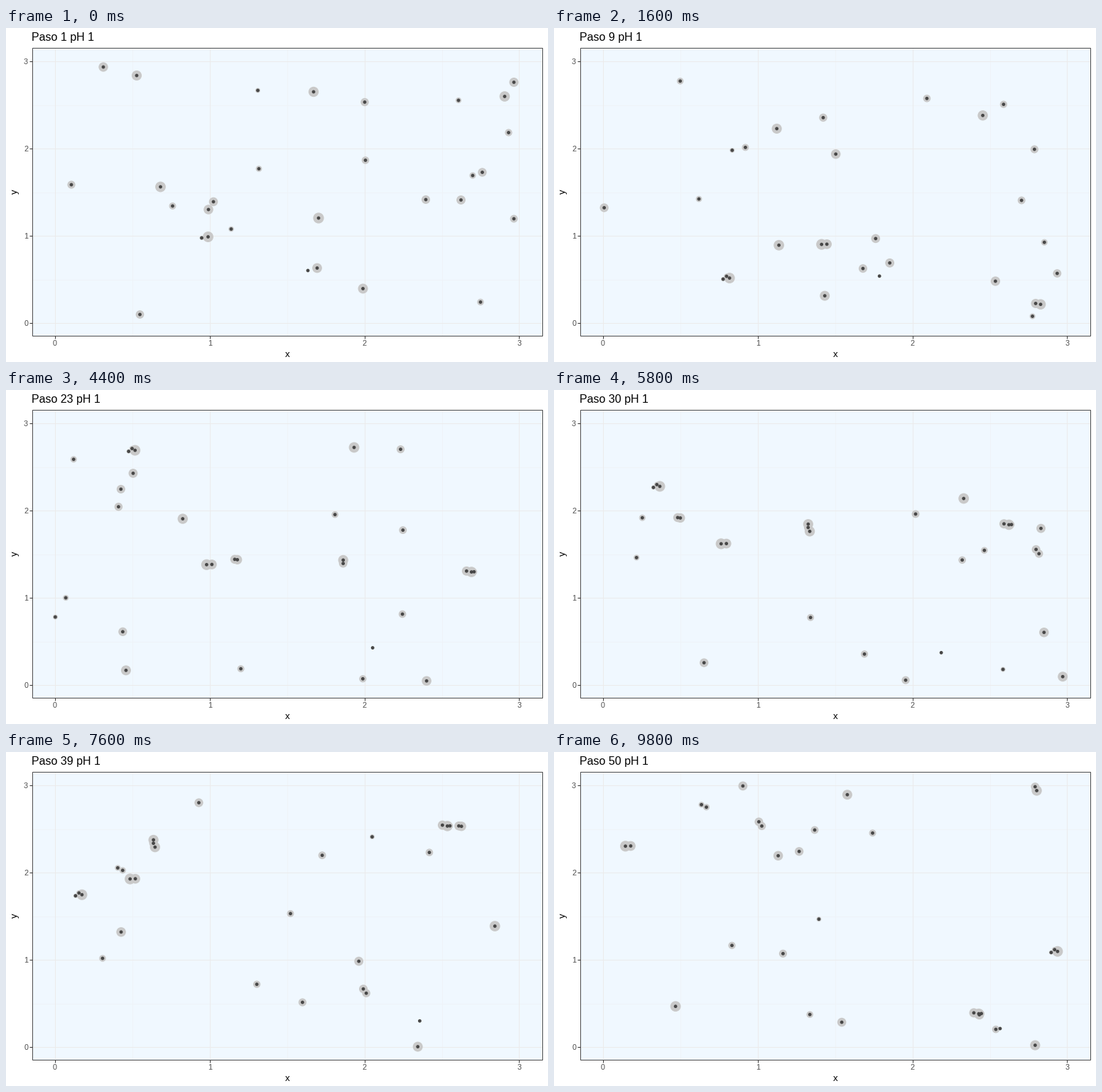
Write a matplotlib script that moves like this. It is 763 by 471 pixels and loops after 10000 ms.

```python
import numpy as np
import matplotlib.pyplot as plt
from matplotlib.animation import FuncAnimation
from matplotlib.patches import Rectangle

W, H, DPI = 763, 471, 100
PX = 72 / DPI                      # one pixel in points
STEPS = 50
CONTACT = 0.055                    # distance at which particles stick, in data units
ORIGIN = np.array([69, 47])        # pixel of x = 0 and of y = 3
SPAN = np.array([653.4, 369.3])    # pixels covered by 0..3
UNIT = SPAN / 3

plt.rcParams["font.family"] = "Liberation Sans"

# start x, y and drift over the whole run, smallest particle first
PATHS = np.array([
    (425, 342, 203, 48), (275.5, 296, -229, 356), (354.5, 88, -635, 517),
    (317, 283.5, -828, 495), (637, 102, 224, -397), (356, 198.5, -931, 261),
    (657, 208, 204, 577), (668, 386.5, 999, 353), (234.5, 251, 214, -506),
    (707.5, 147.5, -457, -244), (506, 186.5, 116, -534), (715, 269, -348, -159),
    (92, 221, -423, -306), (505, 104.5, -772, 134), (188.5, 404, -818, -355),
    (591, 242, -956, 595), (670.5, 203.5, 328, 306), (292, 245, 985, 318),
    (640.5, 242.5, -1028, 544), (715, 76.5, -593, -7), (137, 55, -1035, -412),
    (285, 256, 684, -479), (438, 338.5, -330, -206), (502.5, 367.5, -743, 62),
    (184, 67, 794, 459), (433, 90, 1045, 204), (702, 96.5, -104, -466),
    (217.5, 224, 607, 504), (284.5, 294.5, -229, 356), (440, 268, -407, 372),
])
# particle -> the one it sticks to on first contact
STICKS = {3: 28, 5: 26, 6: 4, 13: 15, 17: 20, 19: 26, 20: 26, 24: 14, 25: 14, 29: 22}

start, speed = PATHS[:, :2], PATHS[:, 2:] / (STEPS - 1)
radii = 2 + 5.6 * np.sqrt(np.linspace(0, 1, len(PATHS)))


def first_contact(a, b):
    n = np.arange(STEPS)[:, None]
    gap = start[a] - start[b] + (speed[a] - speed[b]) * n
    gap = (gap + SPAN / 2) % SPAN - SPAN / 2
    near = np.hypot(*(gap / UNIT).T) < CONTACT
    return near.argmax() if near.any() else STEPS


contact = np.full(len(PATHS), STEPS)
later_speed = speed.copy()
for a, b in STICKS.items():
    contact[a] = first_contact(a, b)
    later_speed[a] = speed[b]


def positions(n):
    free = np.minimum(n, contact)[:, None]
    pos = start + speed * free + later_speed * (n - free)
    return ORIGIN + (pos - ORIGIN) % SPAN


fig = plt.figure(figsize=(W / DPI, H / DPI), dpi=DPI, facecolor="white")
ax = fig.add_axes([0, 0, 1, 1])
ax.set_xlim(0, W)
ax.set_ylim(H, 0)
ax.axis("off")

X0, X1, Y0, Y1 = 37, 755, 28, 434


def panel(**kw):
    ax.add_patch(Rectangle((X0, Y0), X1 - X0, Y1 - Y0, lw=PX, **kw))


def line(xs, ys, color, z=1):
    ax.plot(xs, ys, color=color, lw=PX, solid_capstyle="butt", zorder=z)


def cross(k, color, z):
    gx, gy = ORIGIN + (k, 3 - k) * UNIT
    line([gx, gx], [Y0, Y1], color, z)
    line([X0, X1], [gy, gy], color, z)
    return gx, gy


def label(x, y, s, size, color="black", ha="center", va="baseline", **kw):
    return ax.text(x, y, s, fontsize=size * PX, color=color, ha=ha, va=va, **kw)


def discs(r, color, z):
    size = np.broadcast_to((2 * r * PX) ** 2, len(PATHS))
    return ax.scatter(*positions(0).T, s=size, c=color, linewidths=0, zorder=z)


panel(fc="aliceblue", ec="none", zorder=0)
for k in range(3):
    cross(k + 0.5, "#eef3f8", 0.5)
for k in range(4):
    gx, gy = cross(k, "#ebebeb", 1)
    line([gx, gx], [Y1, Y1 + 4], "#333333")
    line([X0 - 4, X0], [gy, gy], "#333333")
    label(gx, 448.5, str(k), 10.7, "#4d4d4d")
    label(31, gy + 3.8, str(k), 10.7, "#4d4d4d", ha="right")
panel(fc="none", ec="#4d4d4d", zorder=5)

label(396, 464.5, "x", 13.3)
label(13, 231, "y", 13.3, va="center", rotation=90)
title = label(36.3, 17.7, "", 16, ha="left")

halos = discs(radii, "#c9c9c9", 2)
dots = discs(2.4, "#474747", 3)


def update(n):
    pos = positions(n)
    halos.set_offsets(pos)
    dots.set_offsets(pos)
    title.set_text(f"Paso {n + 1} pH 1")
    return halos, dots, title


anim = FuncAnimation(fig, update, frames=STEPS, interval=200,
                     init_func=lambda: update(0), repeat=True, repeat_delay=0)
plt.show()
```
